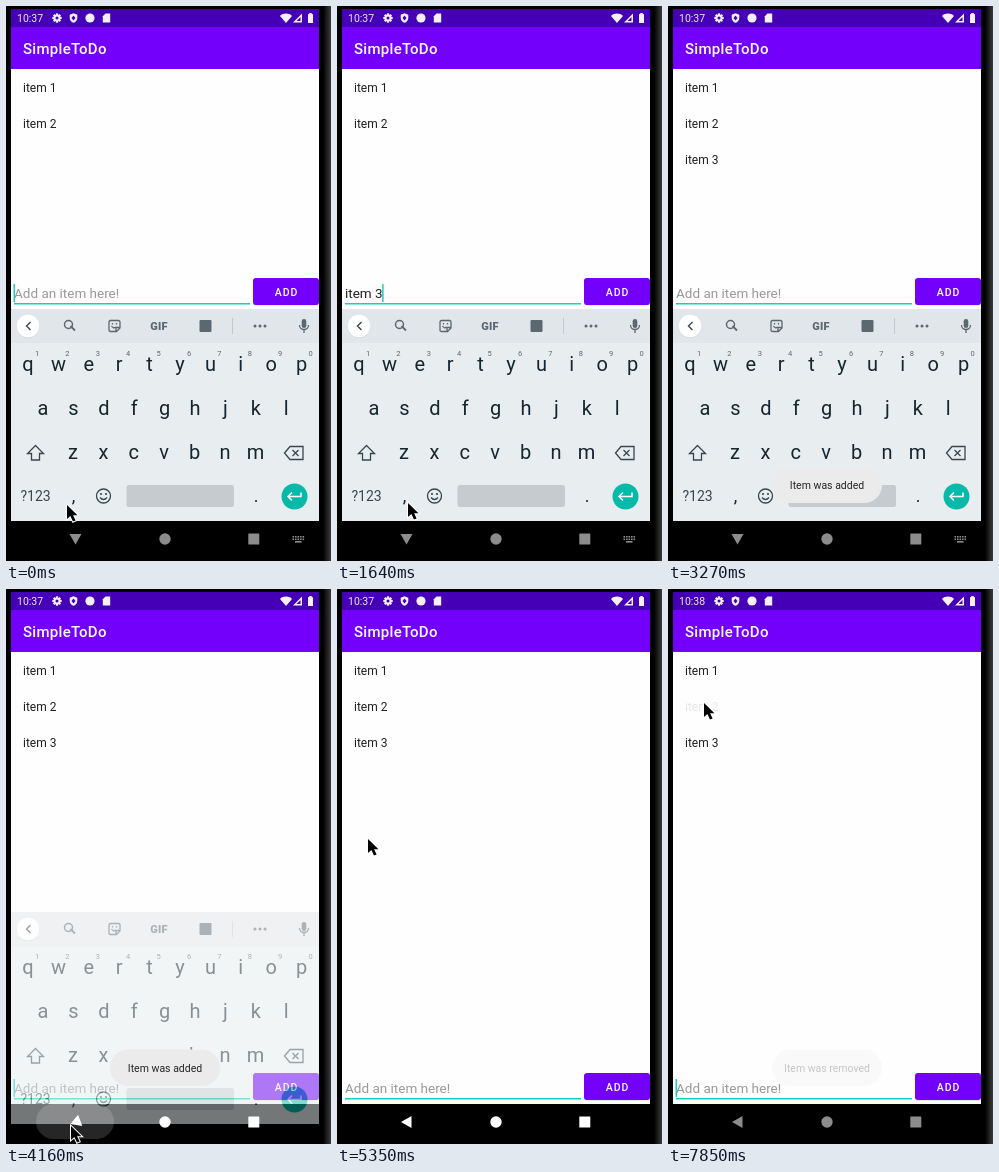
Write an HTML page with a canvas that moves like this. It is 325 px wide and 555 px high and loops after 8 s.

```html
<!DOCTYPE html>
<html lang="en">
<head>
<meta charset="utf-8">
<title>To-do list</title>
<style>
  html, body { margin: 0; width: 100%; height: 100%; overflow: hidden; background: #000; }
  canvas { display: block; }
</style>
</head>
<body>
<canvas id="stage" width="325" height="555"></canvas>
<script>
let ctx = document.getElementById('stage').getContext('2d');
const layer = new OffscreenCanvas(325, 555).getContext('2d');
const LOOP = 8000, STEP = 148.3, LAST = 53;
const PURPLE = '#7200fb', TEAL = '#0fd3bd', INK = '#16262e', ICON = '#5c686f';

// Pointer path: step, x, y
const POINTER = [
  [0, 61, 499], [10, 61, 499], [11, 71, 497], [12, 120, 440], [13, 120, 440],
  [14, 185, 380], [16, 262, 302], [17, 278, 289], [20, 278, 289],
  [24, 120, 545], [26, 70, 538], [28, 65, 537], [29, 65, 537], [31, 55, 475],
  [33, 40, 350], [36, 31, 250], [38, 31, 250], [43, 38, 114], [44, 37, 114],
  [52, 38, 113], [53, 36, 114]
];
// Typed text: step, text, suggestions
const TYPING = [
  [0, ''],
  [1, 'i', ['in', 'I', 'is']],
  [2, 'it', ["it's", 'it', 'its']],
  [4, 'ite', ['item', 'ite', 'iterate']],
  [5, 'item', ['items', 'item', 'itemized']],
  [8, 'item ', ['is', 'in', 'and']],
  [11, 'item 3'],
  [20, '']
];

function text(str, x, y, size, color, { align = 'left', weight = 400, gap = 0 } = {}) {
  ctx.font = `${weight} ${size}px Roboto, sans-serif`;
  ctx.letterSpacing = gap + 'px';
  ctx.textAlign = align;
  ctx.fillStyle = color;
  ctx.fillText(str, x, y);
}
function rect(x, y, w, h, color, r = 0) {
  ctx.fillStyle = color;
  ctx.beginPath();
  ctx.roundRect(x, y, w, h, r);
  ctx.fill();
}
function disc(x, y, r, color) {
  rect(x - r, y - r, 2 * r, 2 * r, color, r);
}
function at(x, y, draw, turn = 0) {
  ctx.save();
  ctx.translate(x, y);
  ctx.rotate(turn);
  draw();
  ctx.restore();
}
function line(d, x, y, color, width = 1.3) {
  at(x, y, () => {
    ctx.strokeStyle = color;
    ctx.lineWidth = width;
    ctx.stroke(new Path2D(d));
  });
}
function shape(d, x, y, color, turn) {
  at(x, y, () => {
    ctx.fillStyle = color;
    ctx.fill(new Path2D(d), 'evenodd');
  }, turn);
}
// Draws a group on its own layer, then blends it as a whole
function faded(alpha, draw) {
  const page = ctx;
  ctx = layer;
  ctx.clearRect(0, 0, 325, 555);
  draw();
  ctx = page;
  ctx.globalAlpha = alpha;
  ctx.drawImage(layer.canvas, 0, 0);
  ctx.globalAlpha = 1;
}

function statusBar(step) {
  rect(5, 3, 308, 18, '#4500b7');
  text(step < 47 ? '10:37' : '10:38', 11, 16, 10.5, '#eee8f8');
  const white = '#f4f0fb';
  for (let i = 0; i < 4; i++) at(51, 12, () => rect(-1.1, -4.7, 2.2, 9.4, white), i * Math.PI / 4);
  disc(51, 12, 3.5, white);
  disc(51, 12, 1.5, '#4500b7');
  shape('M0-4.8 3.8-3.2V0C3.8 2.4 2 4.2 0 4.8-2 4.2-3.8 2.4-3.8 0V-3.2ZM0-2.4-2 0 0 2.6 2 0Z', 67.5, 12, white);
  disc(84, 12, 4.6, white);
  shape('M-1-4.5H3.7V4.5H-3.7V-1.8Z', 100.5, 12, white);
  shape('M0 5-6-2C-3-5.2 3-5.2 6-2Z', 280, 12, white);
  shape('M4.5-4.5V4.5H-4.5ZM3-1-1 3H3Z', 291.5, 12, white);
  rect(302, 8, 5, 9, white, .5);
  rect(303.2, 7, 2.6, 2, white);
}

function list(step) {
  rect(5, 63, 308, 452, '#fefefe');
  const alphas = [1, step < 53 ? 1 : .1, step < 20 ? 0 : step < 21 ? .5 : 1];
  alphas.forEach((a, i) => faded(a, () => text('item ' + (i + 1), 17, 85.5 + 36 * i, 12, '#202020')));
}

function cursorOn(step) {
  const ms = step * STEP;
  if (ms >= 3250) return Math.floor((ms - 3250) / 500) % 2 === 1;
  return step < 15 || step > 17;
}

function inputRow(step, typed, top) {
  at(0, top, () => {
    if (typed) text(typed, 8, 19.5, 13.5, '#202020');
    else text('Add an item here!', 8, 19.5, 13.5, '#999');
    ctx.font = '400 13.5px Roboto, sans-serif';
    const end = 8 + ctx.measureText(typed).width;
    if (typed && !typed.includes(' ')) rect(8, 21.5, end - 8, 1, '#333');
    rect(8, 25, 236, 1.5, TEAL);
    if (cursorOn(step)) rect(end - .5, 6, 1.5, 18, TEAL);
    rect(247, .5, 66, 27, '#d8d4de', 3);
    rect(247, 0, 66, 27, PURPLE, 3);
    if (step === 18 || step === 19) rect(247, 0, 66, 27, 'rgba(255,255,255,.22)', 3);
    text('ADD', 280.5, 17.5, 10.5, '#fff', { align: 'center', weight: 500, gap: .94 });
  });
}

function toolbar() {
  line('M2 1.5 6.5 6', 62.5, 318.5, ICON, 1.8);
  line('M4 0A4 4 0 1 1-4 0 4 4 0 1 1 4 0', 62.5, 318.5, ICON, 1.5);
  line('M-4-5.5H4Q5.5-5.5 5.5-4V2L2 5.5H-4Q-5.5 5.5-5.5 4V-4Q-5.5-5.5-4-5.5M5.5 1.5H1.5V5.5M-3 0Q-1 3 1 1M-2-3V-1.5M2-3V-1.5', 108.5, 320, ICON);
  text('GIF', 153, 324, 11, ICON, { align: 'center', weight: 900, gap: .2 });
  rect(193.5, 314, 12, 12, ICON, 1);
  rect(226, 312, 1, 16, '#c3cacf');
  for (const x of [249, 254, 259]) disc(x, 320, 1.5, ICON);
}

function suggestions(words) {
  words.forEach((w, i) => text(w, 76 + 84 * i, 324, 12.5, INK, { align: 'center' }));
  for (const x of [118, 202]) rect(x, 313, 1, 14, '#c3cacf');
  for (const x of [157, 160, 163]) disc(x, 328, .8, ICON);
}

function keys(letters, x, y) {
  [...letters].forEach((c, i) => text(c, x + 30.4 * i, y, 20, INK, { align: 'center' }));
}

function keyboard(words) {
  rect(5, 303, 308, 212, '#e8edf0');
  rect(5, 303, 308, 34, '#e1e6ea');
  disc(22, 320.5, 11.5, '#d3d9dd');
  disc(22, 320, 11.3, '#fff');
  line(words ? 'M-2-4 2 0-2 4' : 'M2-4-2 0 2 4', 22.5, 320, '#39464d', 1.4);
  if (words) suggestions(words); else toolbar();
  rect(295.7, 313, 4.6, 9, ICON, 2.3);
  line('M-4.5-1A4.5 4.5 0 0 0 4.5-1M0 3.5V7', 298, 320, ICON);

  keys('qwertyuiop', 22, 365);
  [...'1234567890'].forEach((c, i) => text(c, 31 + 30.4 * i, 350, 7.5, ICON, { align: 'center' }));
  keys('asdfghjkl', 37, 409);
  keys('zxcvbnm', 67, 453);

  line('M0-7.5 8 .5H4V7H-4V.5H-8Z', 29.5, 447, '#37474f');
  line('M-9.5 0-4-6.5H9V6.5H-4ZM-1.5-3 4.5 3M4.5-3-1.5 3', 288, 447, '#37474f');
  text('?123', 14.5, 495, 14, '#37474f');
  text(',', 67.5, 496, 18, INK, { align: 'center' });
  line('M7 0A7 7 0 1 1-7 0 7 7 0 1 1 7 0M-3.5 1.5Q0 5.5 3.5 1.5', 97.5, 490, '#37474f');
  disc(95, 488, 1.1, '#37474f');
  disc(100, 488, 1.1, '#37474f');
  rect(120.5, 479, 107.5, 22, '#c6cbcf', 2.5);
  text('.', 250, 496, 18, INK, { align: 'center' });
  disc(288.5, 490.5, 13, '#06b9a8');
  line('M7-4V0H-6M-2-4-6 0-2 4', 288, 490.5, '#fff', 1.5);
}

function navIcons(step) {
  const color = step < 25 || step >= 48 ? '#8c8c8c' : '#fff';
  const turn = step < 28 ? -90 : step < 29 ? -20 : 0;
  if (step >= 27 && step < 30) rect(30, 515, 78, 35, 'rgba(255,255,255,.15)', 17.5);
  shape('M-5.5 0 5-6V6Z', 69.5, 533, color, turn * Math.PI / 180);
  disc(159, 533, 5.7, color);
  rect(242.3, 527.5, 11, 11, color, .5);
  if (step < 26) {
    for (let row = 0; row < 2; row++)
      for (let i = 0; i < 5; i++) rect(286.5 + 2.5 * i, 530 + 2.5 * row, 1.6, 1.6, color);
    rect(289, 535, 6.5, 1.6, color);
  }
}

function toast(str, alpha) {
  faded(alpha, () => {
    rect(104, 460.5, 110, 36.5, '#ebebeb', 18);
    text(str, 159, 483, 10.5, '#252525', { align: 'center' });
  });
}

function pointer(step) {
  if (step > 20 && step < 24) return;
  const i = Math.max(1, POINTER.findIndex(p => p[0] >= step));
  const [s0, x0, y0] = POINTER[i - 1], [s1, x1, y1] = POINTER[i];
  const k = (step - s0) / (s1 - s0);
  const arrow = 'M0 0V14L3.4 11 6 16.6 8.6 15.4 6.1 10.2H10.5Z';
  const x = x0 + (x1 - x0) * k, y = y0 + (y1 - y0) * k;
  line(arrow, x, y, '#fff', 2);
  shape(arrow, x, y, '#000');
}

function draw(ms) {
  const step = Math.min(LAST, Math.floor((ms % LOOP + 14) / STEP));
  const [, typed, words] = TYPING.findLast(entry => entry[0] <= step);
  rect(0, 0, 325, 555, '#000');
  const rim = ctx.createLinearGradient(317, 0, 325, 0);
  rim.addColorStop(0, '#000');
  rim.addColorStop(1, '#3c3c3e');
  rect(317, 0, 8, 555, rim);

  rect(5, 21, 308, 42, PURPLE);
  statusBar(step);
  text('SimpleToDo', 17, 48, 15, '#fff', { weight: 500, gap: .3 });
  list(step);
  inputRow(step, typed, step < 28 ? 272 : 484);

  if (step < 28) keyboard(words);
  else if (step < 29) faded(.5, () => at(0, 20, () => keyboard()));
  navIcons(step);

  if (step >= 21 && step < 36) toast('Item was added', step === 21 || step === 35 ? .3 : 1);
  if (step >= 53) toast('Item was removed', .25);
  pointer(step);
}

const start = performance.now();
function loop() {
  draw(performance.now() - start);
  requestAnimationFrame(loop);
}
loop();
</script>
</body>
</html>
```
